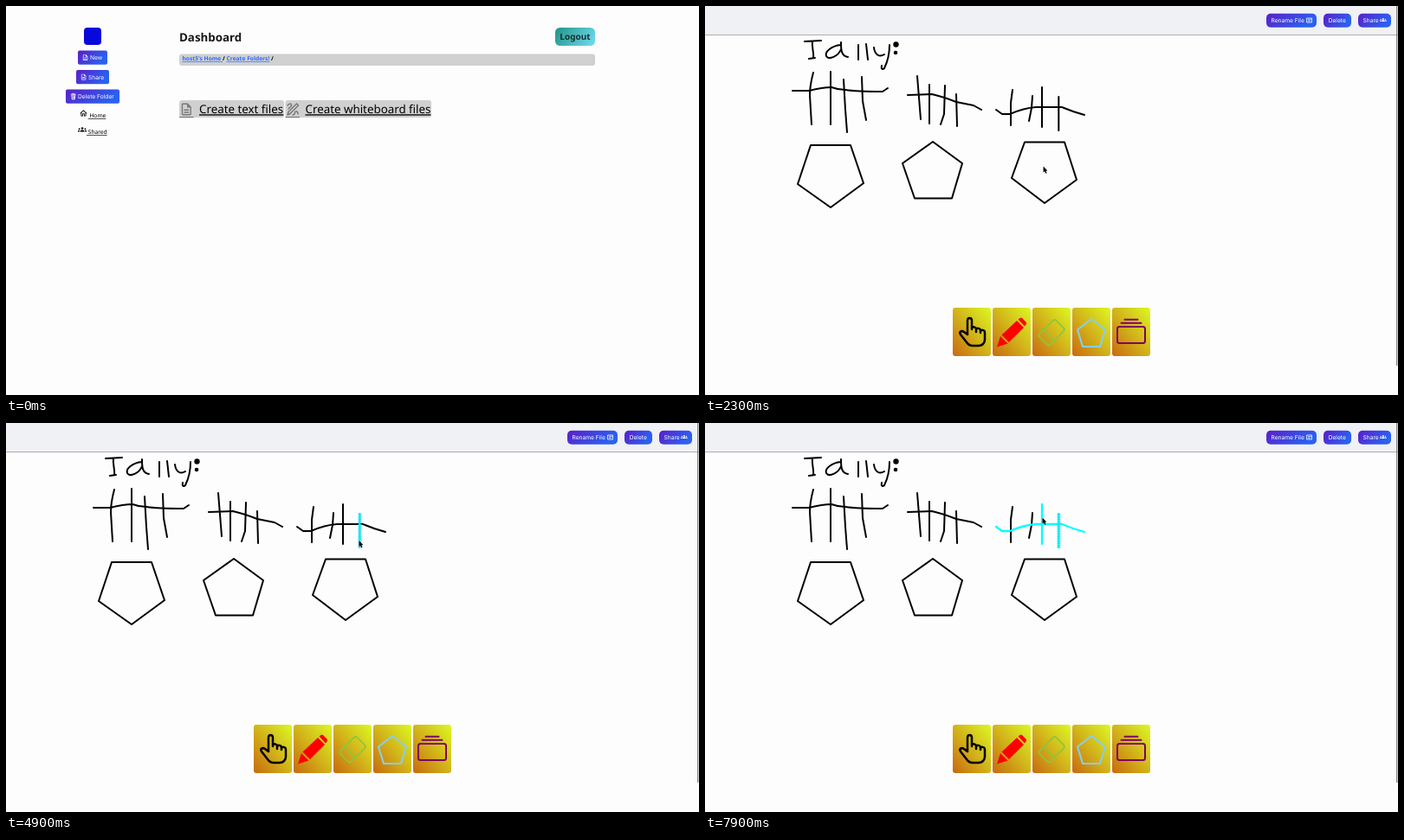
An HTML page for the animation above (8 s loop, 800 by 450 pixels).

```html
<!DOCTYPE html>
<html lang="en">
<head>
<meta charset="utf-8">
<title>Whiteboard demo</title>
<style>
  html, body { margin: 0; width: 100%; height: 100%; overflow: hidden; background: #fdfdfd; }
  svg { display: block; width: 800px; height: 450px; }
  text { font-family: "Noto Sans", sans-serif; text-rendering: geometricPrecision; white-space: pre; }
  .btn { font: 6.67px Inter, sans-serif; fill: #fff; }
  .nav { font-size: 6.67px; text-decoration: underline; }
  .link { font-size: 13.33px; text-decoration: underline; }
  .crumb { font-size: 6.67px; font-weight: 700; }
  .crumb .a { fill: #2b6cff; text-decoration: underline; }
  .line { fill: none; stroke-linecap: round; stroke-linejoin: round; }
  .ink { stroke: #000; stroke-width: 2; }
  #file2.over .link { fill: #444; }
  .tool.over .line { stroke: #6c6a48; }
  .cut { stroke: #0ff; stroke-width: 2.3; }
</style>
</head>
<body>
<svg viewBox="0 0 800 450">
  <defs>
    <linearGradient id="violet" x1="0" y1="0" x2="1" y2=".35">
      <stop offset="0" stop-color="#5a1fc9"/><stop offset="1" stop-color="#2a62f0"/>
    </linearGradient>
    <linearGradient id="teal" x1="0" y1=".3" x2="1" y2=".6">
      <stop offset="0" stop-color="#27988d"/><stop offset="1" stop-color="#6bd6e8"/>
    </linearGradient>
    <linearGradient id="gold" x1="0" y1="1" x2="1" y2="0">
      <stop offset="0" stop-color="#c8690f"/><stop offset=".5" stop-color="#d2b41a"/><stop offset="1" stop-color="#dcf823"/>
    </linearGradient>
    <path id="sheet" d="M8 16h8v2H8zm0-4h8v2H8zm6-10H6c-1.1 0-2 .9-2 2v16c0 1.1.9 2 2 2h12c1.1 0 2-.9 2-2V8l-6-6zm4 18H6V4h7v5h5z"/>
    <g id="people">
      <circle cx="12" cy="8.5" r="3"/><circle cx="4" cy="10" r="2"/><circle cx="20" cy="10" r="2"/>
      <path d="M6 18v-2q0-3 6-3t6 3v2zM0 18v-2q0-3 5-3-1 1-1 5zM24 18v-2q0-3-5-3 1 1 1 5z"/>
    </g>
    <path id="finger" d="M303 377V364c0-4 5-4 5 0v10M308 374c0-4 5-3 5 0v3M313 375c0-3 5-3 5 1v2M318 377c0-3 5-3 5 1v8c0 4-3 7-7 7h-7c-3 0-5-1-7-4l-7-9c-2-3 1-5 4-3l4 3v-4"/>
  </defs>

  <rect width="800" height="450" fill="#fdfdfd"/>

  <g id="home">
    <rect x="90" y="25" width="20" height="20" rx="4" fill="#0808dc"/>
    <g id="side"></g>
    <path d="M12 5.7l5 4.5V18h-2v-6H9v6H7v-7.8zM12 3L2 12h3v8h6v-6h2v6h6v-8h3z" transform="translate(84.3 119) scale(.43)"/>
    <text class="nav" x="94.7" y="129"> Home</text>
    <use href="#people" transform="translate(83 138) scale(.42)"/>
    <text class="nav" x="93" y="148.2"> Shared</text>

    <text x="200" y="40.7" font-size="13.33" font-weight="700" fill="#181818">Dashboard</text>
    <rect x="634" y="25" width="46" height="21" rx="5.5" fill="url(#teal)"/>
    <text x="657" y="39.4" font-size="10" font-weight="700" text-anchor="middle" fill="#16302f">Logout</text>

    <rect x="200" y="55.5" width="480" height="13.6" rx="3" fill="#d0d0d0"/>
    <text class="crumb" x="203.5" y="63.3"><tspan class="a">host5's Home </tspan>/ <tspan class="a">Create Folders!</tspan> /</text>

    <g id="file1">
      <rect x="200" y="109" width="121" height="20" rx="3" fill="#d0d0d0"/>
      <use href="#sheet" transform="translate(200 111.2) scale(.694)" fill="#777"/>
      <path d="M200 128.7h16.5" stroke="#555" stroke-width=".9"/>
      <text class="link" x="223" y="124.3">Create text files</text>
    </g>
    <g id="file2">
      <rect x="322.5" y="109" width="168.5" height="20" rx="3" fill="#d0d0d0"/>
      <path class="line" stroke="#777" stroke-width="1.4" d="M325 126l1-3.500 9.500-9.500 2 2-9.500 9.500zM325 115c2-3 6-2 4 1l-3 3M331 126c4 0 1-4 4-4 2 0 2 2 2 3"/>
      <path d="M322.5 128.7h16.500" stroke="#555" stroke-width=".9"/>
      <text class="link" x="345.5" y="124.3">Create whiteboard files</text>
    </g>
  </g>

  <g id="board">
    <rect width="800" height="33" fill="#eff1f5"/>
    <path d="M0 33.5h800" stroke="#adadad"/>
    <g id="top"></g>
    <g class="line" stroke="#fff" stroke-width=".8">
      <path d="M695 14h5.500v5h-5.500zM696.300 15.700h3M696.300 17.300h2"/>
    </g>
    <use href="#people" transform="translate(779 12.200) scale(.32)" fill="#fff"/>

    <g id="drawing">
      <path d="M798.700 0V416" stroke="#777" stroke-width="1.200"/>
      <g class="line ink">
        <path d="M115 41L134 40M124 41C123 48 126 54 125 60M120 61L127 60"/>
        <path d="M157 45C146 46 138 53 140 58C143 63 154 58 157 50M157 42C157 50 157 58 165 59"/>
        <path d="M177 45V62M186 44L188 62M195 48C196 56 201 60 207 56M213 45C213 55 210 66 207 72C205 74 203 73 204 69"/>
        <circle cx="220.500" cy="44.500" r="2.200" fill="#000"/><circle cx="220" cy="54" r="1.300" fill="#000"/>
        <path d="M125 77Q121 92 121 103L123 137M145 76V137M160 85L162 120L164 146M181 82L182 110L186 132"/>
        <path d="M101 98H120Q136 94 146 94Q154 97 162 97Q175 99 205 99L211 95"/>
        <path d="M245 81L249 131M259 91V136M277 92L276 125L272 137M290 102L291 139"/>
        <path d="M234 103L262 102Q275 105 290 111L310 115L319 120"/>
        <path d="M355 97L353 112V138M378 104L377 118L374 133"/>
        <path id="bar" d="M336 120L343 125H352Q368 118 382 117H412L425 122L438 126"/>
        <path id="third" d="M389 94V140"/>
        <path id="fourth" d="M408.300 105V144"/>
        <path d="M122 161H168L183 205L145 233L107 206Z"/>
        <path d="M263 157L297 182L285 222.500H242L228 182Z"/>
        <path d="M369 157.500H415L429 201L392 228L354 199Z"/>
      </g>
      <path id="teeth" d="M408.500 105V145" stroke="#18d6dc" stroke-width="4" stroke-dasharray="1 1"/>
    </g>

    <g class="tool"><use class="line" href="#finger" stroke="#000" stroke-width="2.500"/></g>
    <g class="tool" fill="#f00">
      <path d="M337 394.500L341 382L349.500 390.500ZM342.500 380.500L360 364L368 372L351 389ZM361.500 362.500L363.500 361Q365 360 366 361L370.500 365.500Q371.500 367 370.500 368.500L369 370.500Z"/>
    </g>
    <g class="tool">
      <g class="line" stroke="#8cc63f" stroke-width="1.700" transform="rotate(-45 400 377.500)">
        <rect x="386.500" y="369" width="27" height="17.500" rx="3"/><path d="M395.500 369v17.500"/>
      </g>
    </g>
    <g class="tool"><path class="line" stroke="#87ceeb" stroke-width="2.200" d="M446 362L462 374.500L456 394H436L430 374.500Z"/></g>
    <g class="tool"><path class="line" stroke="#800060" stroke-width="2" d="M484.500 362.700H499.500M480.500 366.700H503.500M478.500 371H505.500Q508 371 508 373.500V387.500Q508 390 505.500 390H478.500Q476 390 476 387.500V373.500Q476 371 478.500 371Z"/></g>
  </g>

  <g id="cursor">
    <path id="arrow" d="M0 0V7L1.600 5.700L2.700 8.300L4 7.700L2.900 5.300L4.800 5Z" fill="#000" stroke="#fff" stroke-width=".5" paint-order="stroke"/>
    <path id="hand" d="M-.8 0Q0-.8.800 0V2.600L3.700 3.500Q4.300 4 4 5.500L3 8H-.500L-2.800 4.800Q-2.400 4-1 5Z" fill="#000" stroke="#fff" stroke-width=".4" paint-order="stroke"/>
  </g>
</svg>
<script>
const LOOP = 8000, STEP = 100;
const $ = id => document.getElementById(id);
const show = (el, on) => { el.style.display = on ? '' : 'none'; };

const button = (x, y, w, h, r, tx, label) =>
  `<rect x="${x}" y="${y}" width="${w}" height="${h}" rx="${r}" fill="url(#violet)"/>` +
  `<text class="btn" x="${tx}" y="${y + h / 2 + 2.4}">${label}</text>`;

$('side').innerHTML =
  button(83, 51.5, 34, 16.3, 2, 97, 'New') +
  button(81, 74, 38, 16.3, 2, 95, 'Share') +
  button(69, 96.5, 62, 16.3, 2, 83, 'Delete Folder') +
  '<use href="#sheet" transform="translate(87.500 55.500) scale(.34)" fill="#fff"/>' +
  '<use href="#sheet" transform="translate(85.500 78) scale(.34)" fill="#fff"/>' +
  '<path class="line" stroke="#fff" stroke-width=".8" d="M75 102.200h5.500M76.700 101.300h2M75.800 103.500l.5 4.500h3l.5-4.500zM77.100 104.500v2.300M78.500 104.500v2.300"/>';

$('top').innerHTML =
  button(648, 8.800, 58, 16, 5, 653.5, 'Rename File') +
  button(714, 8.800, 32, 16, 5, 719.7, 'Delete') +
  button(754, 8.800, 38, 16, 5, 759.5, 'Share');

const tools = [...document.querySelectorAll('.tool')];
const toolX = i => 286 + 46 * i;
tools.forEach((tool, i) => tool.insertAdjacentHTML('afterbegin',
  `<rect x="${toolX(i)}" y="349" width="44" height="56" rx="3" fill="url(#gold)"/>`));

// Pointer path: time, x, y
const path = [
  [1500, 388, 137], [1800, 388, 125], [2100, 388, 125], [2800, 397, 337],
  [3000, 411, 375], [3200, 411, 375], [3700, 486, 370], [3900, 480, 350],
  [4300, 404, 158], [4500, 407.5, 136], [5000, 407.5, 136], [5400, 395, 119],
  [5800, 395, 119], [6100, 386, 116.5], [6300, 386, 116.5], [6400, 387, 114.5],
  [6800, 387, 114.5], [7200, 384, 132], [7700, 389.5, 109.5], [8000, 389.5, 109.5]
];

function pointer(t) {
  const i = path.findIndex(p => p[0] > t);
  const [t0, x0, y0] = path[i - 1], [t1, x1, y1] = path[i];
  const k = (t - t0) / (t1 - t0);
  return [x0 + (x1 - x0) * k, y0 + (y1 - y0) * k];
}

function draw(t) {
  const onBoard = t >= 2000, visible = t >= path[0][0];
  const [x, y] = visible ? pointer(t) : [-50, -50];
  const overFile = !onBoard && x > 322 && x < 491 && y > 109 && y < 129;
  let overTool = false;

  show($('home'), !onBoard);
  show($('board'), onBoard);
  show($('drawing'), t >= 2100);
  $('file2').classList.toggle('over', overFile);
  tools.forEach((tool, i) => {
    const over = onBoard && x > toolX(i) && x < toolX(i) + 44 && y > 349 && y < 405;
    tool.classList.toggle('over', over);
    overTool = overTool || over;
  });

  $('fourth').classList.toggle('cut', t >= 4900);
  show($('teeth'), t >= 4900);
  $('bar').classList.toggle('cut', t >= 5700);
  $('third').classList.toggle('cut', t >= 7900);

  const hand = overFile || overTool;
  show($('cursor'), visible);
  show($('hand'), hand);
  show($('arrow'), !hand);
  $('cursor').setAttribute('transform', `translate(${x} ${y})`);
}

const start = performance.now();
function tick() {
  const t = (performance.now() - start) % LOOP;
  draw(Math.floor(t / STEP) * STEP);
  requestAnimationFrame(tick);
}
tick();
</script>
</body>
</html>
```
